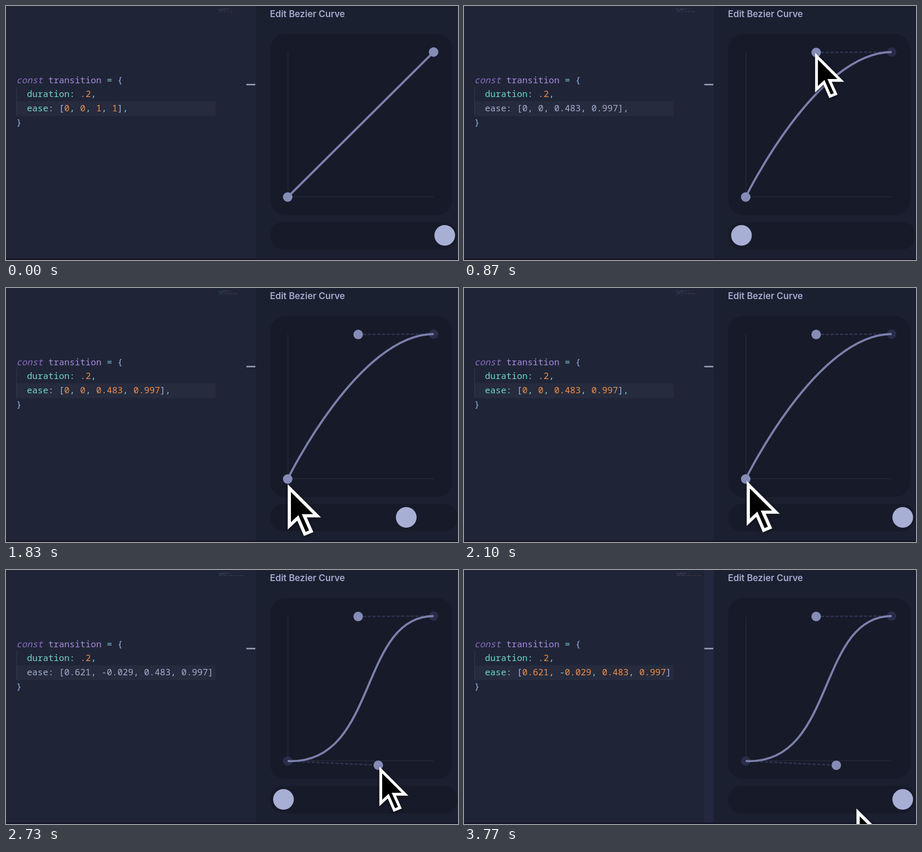
Animation of 852 by 480 pixels, one loop 3830 ms. Source, as an HTML page with a canvas:

```html
<!DOCTYPE html>
<html lang="en">
<head>
<meta charset="utf-8">
<title>Edit Bezier Curve</title>
<style>
  html, body { margin: 0; width: 100%; height: 100%; overflow: hidden; background: #1f2537; }
  canvas { display: block; }
</style>
</head>
<body>
<canvas id="stage" width="852" height="480"></canvas>
<script>
const ctx = document.getElementById('stage').getContext('2d');
const layer = Object.assign(document.createElement('canvas'), { width: 852, height: 480 });
const layerCtx = layer.getContext('2d');

const LOOP = 3830;
const GRAPH = { x: 531, y: 361, w: 275, h: 274 };
const PRESS_1 = 290, RELEASE_1 = 1140, PRESS_2 = 2110, RELEASE_2 = 3100;
const PLAY_1 = 1671, PLAY_2 = 3199, PLAY_TIME = 300;
const CHAR_WIDTH = 10.03, LINE_HEIGHT = 26.8;

const clamp = v => Math.min(1, Math.max(0, v));
const lerp = (a, b, f) => a + (b - a) * f;
const progress = (t, start, duration) => clamp((t - start) / duration);
const smooth = (t, start, duration) => {
  const u = progress(t, start, duration);
  return u * u * (3 - 2 * u);
};
const toStage = ([x, y]) => [GRAPH.x + x * GRAPH.w, GRAPH.y - y * GRAPH.h];

// Control points as they are dragged
function startHandle(t) {
  const f = smooth(t, 2130, 437);
  return [0.621 * f, -0.029 * f ** 1.6];
}
function endHandle(t) {
  const f = smooth(t, 320, 511);
  return [1 - 0.517 * f, 1 - 0.003 * f + 0.0121 * Math.sin(Math.PI * f)];
}

function cubicBezier([x1, y1], [x2, y2], x) {
  const axis = (a, b, s) => 3 * (1 - s) ** 2 * s * a + 3 * (1 - s) * s * s * b + s ** 3;
  let low = 0, high = 1;
  for (let i = 0; i < 24; i++) {
    const mid = (low + high) / 2;
    if (axis(x1, x2, mid) < x) low = mid; else high = mid;
  }
  return axis(y1, y2, low);
}

function ballProgress(t) {
  if (t < PRESS_1) return 1;
  const start = t < PRESS_2 ? PLAY_1 : PLAY_2;
  return cubicBezier(startHandle(t), endHandle(t), progress(t, start, PLAY_TIME));
}

function cursorTip(t) {
  if (t < PRESS_1) {
    const f = smooth(t, 80, 210);
    return [lerp(868, 804, f), lerp(210, 87, f)];
  }
  if (t < 1180) {
    const [x, y] = toStage(endHandle(t));
    return [x - 2, y];
  }
  if (t < 1950) {
    const f = smooth(t, 1180, 400);
    return [lerp(662, 531, f ** 1.7), lerp(88, 370, f)];
  }
  const [x, y] = toStage(startHandle(t + 14));
  const settle = smooth(t, 1950, 180);
  const leave = smooth(t, 3320, 300);
  return [x + lerp(0, 2, settle) + 36 * leave, y + lerp(9, 2, settle) + 79 * leave];
}

function cursorScale(t) {
  const shrink = 0.12;
  const bounce = since => 1 - shrink * Math.exp(-since / 320) * Math.cos(Math.PI * since / 130);
  if (t < RELEASE_1) return 1 - shrink * smooth(t, PRESS_1, 120);
  if (t < PRESS_2) return bounce(t - RELEASE_1);
  if (t < RELEASE_2) return 1 - shrink * smooth(t, PRESS_2, 120);
  return bounce(t - RELEASE_2);
}

function circle(x, y, radius, color) {
  ctx.fillStyle = color;
  ctx.beginPath();
  ctx.arc(x, y, radius, 0, 2 * Math.PI);
  ctx.fill();
}

function rect(x, y, w, h, color, radius = 0) {
  ctx.fillStyle = color;
  ctx.beginPath();
  ctx.roundRect(x, y, w, h, radius);
  ctx.fill();
}

function line(points, color, width, dash = []) {
  ctx.strokeStyle = color;
  ctx.lineWidth = width;
  ctx.setLineDash(dash);
  ctx.beginPath();
  points.forEach(p => ctx.lineTo(...p));
  ctx.stroke();
  ctx.setLineDash([]);
}

function tokenColor(token) {
  if (token === 'const') return '#8e6cc4';
  if (token === 'transition') return '#a98ce0';
  if (/[a-z]/.test(token)) return '#72d8c6';
  if (/\d/.test(token)) return '#ee9150';
  if (/[=:,-]/.test(token)) return '#7fcfe0';
  return '#9db3e6';
}

function drawCode(t) {
  const dragging = (t >= 320 && t < RELEASE_1) || (t >= 2130 && t < RELEASE_2);
  const values = [...startHandle(t), ...endHandle(t)].map(v => parseFloat(v.toFixed(3)) || 0);
  const lines = ['const transition = {', '  duration: .2,', `  ease: [${values.join(', ')}],`, '}'];
  lines.forEach((text, row) => {
    for (const match of text.matchAll(/[a-z]+|[\d.]+|[^\s\w.]/g)) {
      const token = match[0];
      ctx.font = `${token === 'const' ? 'italic ' : ''}500 16.72px "Noto Sans Mono", monospace`;
      ctx.fillStyle = dragging && row === 2 ? '#a4aed0' : tokenColor(token);
      ctx.fillText(token, match.index * CHAR_WIDTH, row * LINE_HEIGHT);
    }
  });
}

function drawEditor(t) {
  rect(0, 0, 471, 480, '#1f2537');
  rect(20, 180, 375, 28, '#262b3d');
  rect(19.5, 153, 1, 55, '#363c52');

  ctx.save();
  ctx.beginPath();
  ctx.rect(0, 0, 391, 480);
  ctx.clip();
  ctx.translate(19.5, 145.5);
  drawCode(t);
  ctx.restore();

  // Minimap
  ctx.save();
  ctx.globalAlpha = 0.75;
  ctx.translate(399, 5.5);
  ctx.scale(0.13, 0.1);
  drawCode(t);
  ctx.restore();

  if (t >= RELEASE_2) {
    ctx.globalAlpha = lerp(1, 0.4, progress(t, 3230, 500));
    rect(453, 0, 17, 480, '#2a2d4c');
    ctx.globalAlpha = 1;
  }
  rect(453, 147, 17, 3, '#8d92ad');
}

function drawGraph(t) {
  rect(471, 0, 381, 480, '#1b2030');
  ctx.font = '600 17px Inter, sans-serif';
  ctx.fillStyle = '#a4abcf';
  ctx.fillText('Edit Bezier Curve', 497.5, 21);

  rect(498, 53, 343, 342, '#171a28', 28);
  rect(498, 408, 353, 52, '#171a28', 25);

  const origin = toStage([0, 0]), corner = toStage([1, 1]);
  line([[531.5, 87], [531.5, 360.5], [806, 360.5]], '#2a2e42', 1);

  const first = toStage(startHandle(t)), second = toStage(endHandle(t - 16));
  circle(...origin, 9, '#292d49');
  circle(...corner, 9, '#292d49');
  line([origin, first], '#2f3453', 2.5, [6, 3]);
  line([second, corner], '#2f3453', 2.5, [6, 3]);

  ctx.strokeStyle = '#7b80ac';
  ctx.lineWidth = 4;
  ctx.beginPath();
  ctx.moveTo(...origin);
  ctx.bezierCurveTo(...first, ...second, ...corner);
  ctx.stroke();

  // An untouched start handle sits on its anchor; a dragged one leaves it behind
  circle(...first, 9, '#858cb7');
  circle(...second, 9, '#858cb7');
  circle(523 + 304 * ballProgress(t), 433.5, 19.5, '#a8afd5');
}

// Average several moments of one exposure to get motion blur
function drawCursor(t) {
  const samples = 8, shutter = 25;
  const arrow = [[3, 8], [3, 79], [19, 64], [32, 94], [44, 89], [31, 60], [55, 60]];
  layerCtx.setTransform(1, 0, 0, 1, 0, 0);
  layerCtx.clearRect(0, 0, 852, 480);
  layerCtx.globalCompositeOperation = 'lighter';
  layerCtx.globalAlpha = 1 / samples;
  layerCtx.strokeStyle = '#fff';
  layerCtx.lineWidth = 6;

  const outline = new Path2D(), inside = new Path2D();
  arrow.forEach(p => { outline.lineTo(...p); inside.lineTo(...p); });
  outline.closePath();

  for (let i = 0; i < samples; i++) {
    const moment = t + shutter * ((i + 0.5) / samples - 0.5);
    const scale = cursorScale(moment);
    layerCtx.setTransform(scale, 0, 0, scale, ...cursorTip(moment));
    // The inner half of the stroke overlaps the black fill, which adds nothing in colour
    layerCtx.fillStyle = '#000';
    layerCtx.fill(inside);
    layerCtx.stroke(outline);
  }
  ctx.save();
  ctx.shadowColor = 'rgba(0, 0, 0, 0.45)';
  ctx.shadowBlur = 7;
  ctx.shadowOffsetY = 2;
  ctx.drawImage(layer, 0, 0);
  ctx.restore();
}

function draw() {
  const t = performance.now() % LOOP;
  drawEditor(t);
  drawGraph(t);
  rect(0, 477.5, 852, 2.5, '#141526');
  if (t > 80) drawCursor(t);
  requestAnimationFrame(draw);
}
draw();
</script>
</body>
</html>
```
